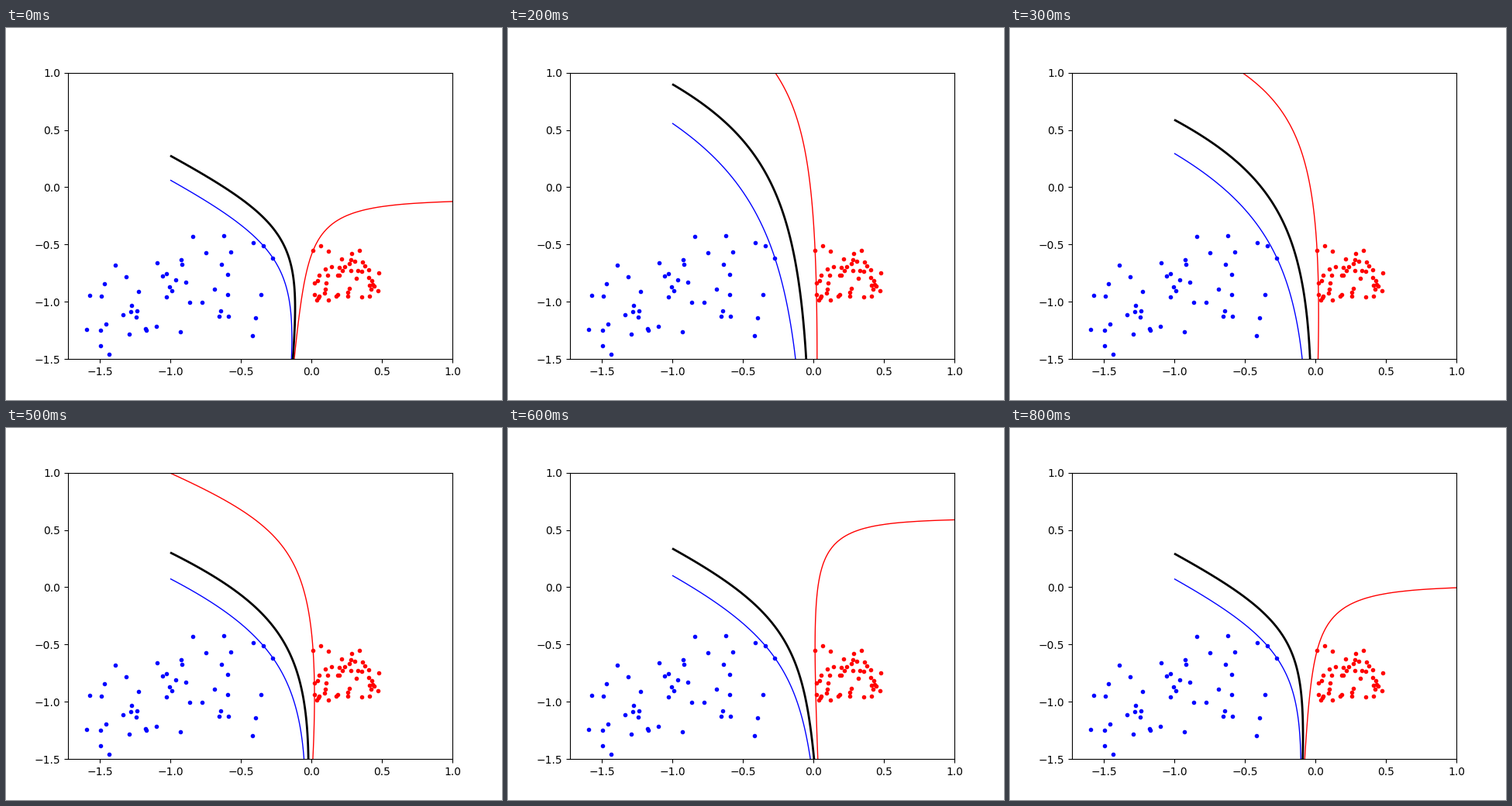
Animation, 640 px wide and 480 px high, one loop 0.9 s. Source, as a matplotlib script:

```python
from itertools import combinations

import matplotlib.pyplot as plt
import numpy as np
from matplotlib.animation import FuncAnimation

W, H, DPI = 640, 480, 100
XLIM, YLIM = (-1.725, 1.0), (-1.5, 1.0)
DEGREES = [10, *range(2, 10)]
PER_CLASS = 50

# points next to the gap decide the boundary
NEAR_BLUE = [(-0.2728, -0.6173), (-0.3387, -0.5131), (-0.410, -0.484)]
NEAR_RED = [(0.0123, -0.5530), (0.0222, -0.9373), (0.0222, -0.8358),
            (0.066, -0.511), (0.039, -0.985)]
# points on the rim of each cloud
RIM_BLUE = [(-0.621, -0.423), (-0.842, -0.430), (-1.390, -0.680),
            (-1.571, -0.944), (-1.593, -1.242), (-1.434, -1.458),
            (-0.417, -1.296), (-0.357, -0.937)]
RIM_RED = [(0.121, -0.985), (0.412, -0.951), (0.473, -0.903),
           (0.478, -0.748), (0.341, -0.552)]
# corners: top left, top right, bottom right, bottom left
AREA_BLUE = [(-1.5, -0.75), (-0.6, -0.46), (-0.38, -1.15), (-1.5, -1.42)]
AREA_RED = [(0.04, -0.55), (0.46, -0.55), (0.46, -0.97), (0.04, -0.97)]


def cloud(fixed, corners, rng):
    """Fixed points plus random ones spread inside a quadrilateral."""
    a, b, c, d = np.array(corners)
    u, v = rng.random((2, PER_CLASS - len(fixed), 1))
    fill = (1 - v) * ((1 - u) * a + u * b) + v * ((1 - u) * d + u * c)
    return np.vstack([fixed, fill])


rng = np.random.default_rng(7)
blue = cloud(NEAR_BLUE + RIM_BLUE, AREA_BLUE, rng)
red = cloud(NEAR_RED + RIM_RED, AREA_RED, rng)

X = np.array(NEAR_BLUE + NEAR_RED)
T = np.repeat([1.0, -1.0], [len(NEAR_BLUE), len(NEAR_RED)])


def kernel(a, b, degree):
    return (a @ b.T + 1) ** degree


def fit(degree):
    """Hard-margin classifier: support indices, weights and bias."""
    K = kernel(X, X, degree)
    for n in range(2, len(X) + 1):
        for sub in combinations(range(len(X)), n):
            s = list(sub)
            t = T[s]
            if abs(t.sum()) == n:
                continue
            A = np.zeros((n + 1, n + 1))
            A[:n, :n] = K[np.ix_(s, s)] * np.outer(t, t)
            A[:n, n] = A[n, :n] = t
            z = np.linalg.lstsq(A, np.r_[np.ones(n), 0], rcond=1e-13)[0]
            w, b = z[:n] * t, z[n]
            margin = T * (K[:, s] @ w + b)
            if z[:n].min() > 0 and margin.min() > 1 - 1e-4:
                return s, w, b
    raise ValueError("classes cannot be separated")


gx, gy = np.meshgrid(np.linspace(-1, 1, 100), np.linspace(-1.5, 1, 100))
grid = np.stack([gx, gy], axis=-1)


def field(degree):
    s, w, b = fit(degree)
    return kernel(grid, X[s], degree) @ w + b


fields = [field(d) for d in DEGREES]

fig, ax = plt.subplots(figsize=(W / DPI, H / DPI), dpi=DPI)
ax.plot(*blue.T, "b.")
ax.plot(*red.T, "r.")
lines = None


def update(i):
    global lines
    if lines is not None:
        lines.remove()
    lines = ax.contour(gx, gy, fields[i], (-1, 0, 1),
                       colors=("red", "black", "blue"),
                       linewidths=(1, 2, 1), linestyles="solid")
    ax.set(xlim=XLIM, ylim=YLIM)
    return []


anim = FuncAnimation(fig, update, frames=len(DEGREES), init_func=lambda: [],
                     interval=100, repeat_delay=0, blit=False)
plt.show()
```
